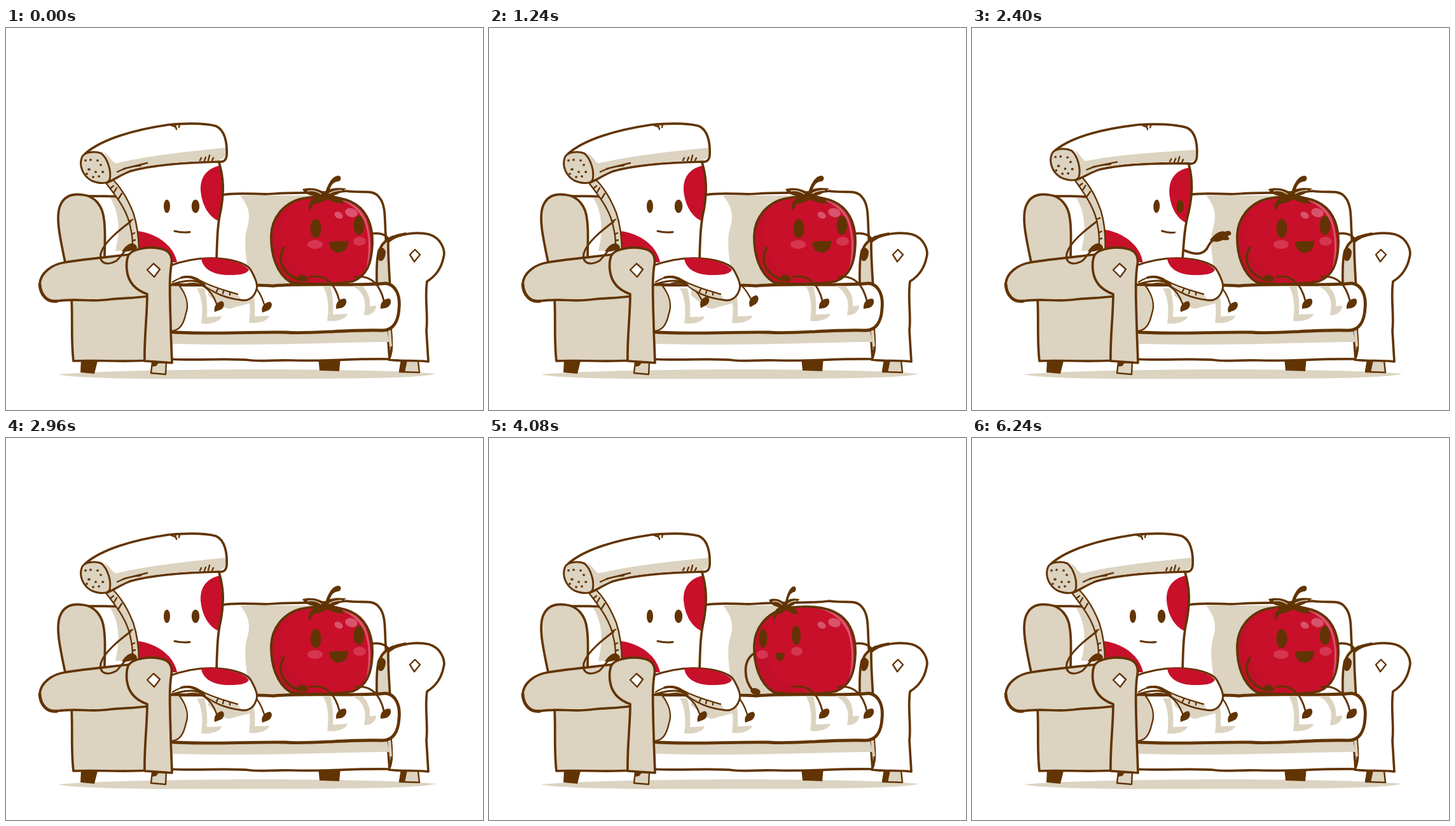
Recreate the animation shown at these times as an HTML page. Size 750 by 600 pixels, loop 6.4 s.

```html
<!DOCTYPE html>
<html lang="en">
<head>
<meta charset="utf-8">
<title>Pizza and tomato on a sofa</title>
<style>
  html, body { margin: 0; width: 100%; height: 100%; overflow: hidden; background: #fff; }
  svg { display: block; width: 750px; height: 600px; }
  .line, .white, .beige { stroke: #623403; stroke-width: 3.7; stroke-linecap: round; stroke-linejoin: round; fill: none; }
  .white { fill: #fff; }
  .beige { fill: #dcd3c1; }
  .paper { fill: #fff; }
  .shade { fill: #dcd3c1; }
  .ink { fill: #623403; }
  .red { fill: #c8102b; }
  .pink { fill: #d8536b; }
  .blush { fill: #d6354f; }
  .thin { stroke-width: 2.4; }
  .mid { stroke-width: 3; }
  .bold { stroke-width: 4.8; }
</style>
</head>
<body>
<svg viewBox="0 0 750 600">
  <path class="shade" d="M82 544C180 535 560 533 676 543C650 551 520 551 380 551C230 552 110 551 82 544Z"/>

  <!-- sofa back -->
  <path class="white" d="M121 263C145 266 160 262 185 266L341 262C370 257 400 263 425 260C450 258 510 260 535 256C560 260 577 253 586 265C598 278 595 300 597 325L600 410H150Z"/>
  <path class="shade" d="M164 267C178 290 180 318 172 350H215V267Z"/>
  <path class="shade" d="M368 263C386 285 384 300 377 322C374 350 380 375 385 402H480V263Z"/>
  <path class="beige" d="M93 368C85 330 77 295 86 277C93 262 108 260 121 262C140 264 152 280 154 300C157 320 155 340 155 364Z"/>

  <!-- sofa feet -->
  <path class="ink" d="M118 521L144 523L139 543L117 541ZM491 518H526L524 539L493 538Z"/>
  <path class="beige thin" d="M230 525H252L251 544L228 542Z"/>
  <path class="beige thin" d="M622 522L648 523L650 541L619 540Z"/>
  <path class="ink" d="M621 522H631L627 541L618 540ZM229 526H240L236 531L229 532Z"/>

  <!-- front panel -->
  <path class="white" d="M255 477H600L603 520C540 519 500 524 450 522C420 521 405 524 385 522C350 518 300 523 258 520Z"/>
  <path class="shade" d="M262 479L599 476L603 493C500 494 400 500 262 496Z"/>

  <!-- right arm -->
  <path class="beige" d="M583 402C582 360 583 342 603 331C612 325 620 325 628 323L606 402Z"/>
  <path class="white" d="M601 336C616 322 648 320 665 324C685 330 691 350 688 360C684 380 672 392 662 398C658 425 664 450 661 475L664 524C640 521 625 524 602 521C609 505 606 490 605 470C608 440 600 370 601 336Z"/>
  <path class="shade" d="M600 474L605 474L607 500L603 500Z"/>
  <path class="line thin" d="M643 348L651 356L642 367L635 356Z"/>

  <!-- seat cushion -->
  <path class="white bold" d="M255 403C300 405 370 402 420 405C480 400 550 406 597 401C613 403 620 420 618 440C617 462 608 475 592 475C540 473 480 481 440 478C380 477 300 482 255 477Z"/>
  <path class="beige thin" d="M258 404L272 404C283 418 288 434 283 448C279 466 273 476 258 476Z"/>
  <g class="shade">
    <path d="M318 408H392L388 430C375 436 362 437 352 441C342 441 332 432 318 420Z"/>
    <path id="cast" d="M498 405L510 405C514 420 515 435 514 450L537 449C535 457 520 462 505 460C508 440 507 420 498 405Z"/>
    <use href="#cast" x="-198" y="4"/>
    <use href="#cast" x="-123" y="3"/>
    <path d="M545 405L560 405C570 415 573 425 572 437L582 436C582 446 572 452 563 451C566 435 566 425 555 412Z"/>
  </g>

  <!-- pizza -->
  <g id="poker">
    <path class="line" d="M300 347L333 349C350 356 361 357 369 347C374 338 377 333 384 329"/>
    <path class="ink" d="M374 333C382 322 392 317 398 320C404 317 409 320 407 325C402 326 401 327 405 331C400 336 396 331 392 334C385 337 378 336 374 333Z"/>
  </g>
  <g id="pizza">
    <path class="paper" d="M160 238C185 262 198 290 205 366L331 364C331 335 332 310 338 285C343 255 342 235 335 208Z"/>
    <path class="red" d="M336 216C315 221 305 235 306 255C308 280 320 297 334 303C341 280 343 250 336 216Z"/>
    <path class="red" d="M207 319C235 322 263 340 269 368H209Z"/>
    <path class="line" d="M335 211C342 235 343 255 338 285C332 310 332 335 331 364"/>
    <path class="beige thin" d="M156 242C178 270 192 290 196 315C200 330 199 340 199 352L209 352C209 325 205 305 200 290C190 265 180 250 168 238Z"/>
    <path class="line thin" d="M164 252L169 248M170 258L174 251M177 268L182 260M194 303L199 301M198 324L202 322M199 334L203 333"/>
    <path class="white" d="M125 197C150 175 200 160 255 152C290 149 315 150 330 154C344 160 348 180 347 200C346 208 342 211 335 210C290 211 230 215 195 225C180 230 172 238 158 243Z"/>
    <path class="shade" d="M154 196C165 202 169 215 175 212C230 199 290 194 345 188L345 203L335 208C290 209 230 213 195 223L164 238C166 222 163 208 154 196Z"/>
    <path class="beige mid" d="M119 204C122 194 140 193 150 197C160 205 166 225 163 238C160 246 145 244 135 240C120 232 115 216 119 204Z"/>
    <path class="line" d="M125 208h.1M133 207h.1M144 208h.1M130 222h1M141 226h.1M152 226h.5M127 229h.1M137 234h.1M146 233h.1M149 215h.1"/>
    <path class="line thin" d="M175 226Q190 218 212 216M185 221L222 212M260 153L265 155M266 153L268 159M273 152L272 156M305 208L307 204M312 208L314 203M318 208L320 200M324 208L326 204"/>
    <g class="ink">
      <ellipse id="pEye1" rx="5" ry="10.5"/>
      <ellipse id="pEye2" rx="6.2" ry="10.5"/>
    </g>
    <path id="pMouth" class="line mid" d="M265 319Q277 322 289 320.5"/>
  </g>
  <g id="pLeg1">
    <path class="line thin" d="M285 402C305 398 322 408 331 433"/>
    <path class="ink" d="M328 446C326 436 332 430 340 429C345 432 343 441 336 443Z"/>
  </g>
  <g id="pLeg2">
    <path class="line thin" d="M356 396C385 394 398 408 406 434"/>
    <path class="ink" d="M403 447C400 437 407 431 415 430C421 433 417 442 411 444Z"/>
  </g>
  <path class="white mid" d="M250 376C280 364 310 360 335 362C362 364 382 372 386 382C393 395 397 405 393 413C389 424 380 430 368 427C345 424 325 416 310 402C295 394 280 396 250 406Z"/>
  <path class="red" d="M307 362C330 359 372 366 382 380C378 387 366 388 350 388C325 388 309 378 307 362Z"/>
  <path class="shade" d="M312 402C328 410 345 414 364 418L369 425C342 422 327 414 312 404Z"/>
  <path class="line thin" d="M262 399C278 389 290 387 304 396C325 408 345 412 364 418M333 410L331 414M342 413L341 417M352 416L352 419"/>
  <path class="line" d="M276 392C292 388 302 396 312 404"/>

  <!-- left arm -->
  <path class="beige" d="M103 424C105 460 102 490 106 523C140 521 180 525 225 522V415Z"/>
  <path class="beige" d="M93 368C72 371 54 385 53 402C54 420 65 431 80 429C110 424 135 431 165 426C190 424 205 424 225 421V352C180 358 130 362 93 368Z"/>
  <path class="line bold" d="M53 402C54 420 65 431 80 429"/>
  <path class="beige" d="M193 356C200 347 225 342 245 347C258 350 262 360 260 372C256 395 258 430 259 470L261 526L218 523C217 490 222 450 222 418C205 412 192 400 190 380C189 370 190 362 193 356Z"/>
  <path class="white thin" d="M232 370L242 379L233 391L222 380Z"/>
  <path class="line mid" d="M196 304C180 316 154 336 149 354C146 371 160 373 173 366C181 360 186 347 197 343"/>
  <path class="ink" d="M182 351C188 342 196 335 203 340C209 345 205 350 198 349C192 352 187 351 182 351Z"/>

  <!-- tomato -->
  <path class="line" d="M575 323C590 321 597 325 602 332M608 328C592 336 586 344 588 357"/>
  <path class="ink" d="M584 350C588 342 594 344 597 351C597 360 593 367 588 366C583 362 583 356 584 350Z"/>
  <path id="body" class="red" d="M417 325C418 300 435 275 465 268C495 262 530 264 550 277C570 290 577 315 576 340C575 370 567 390 545 398C520 403 470 403 447 399C425 385 416 355 417 325Z"/>
  <path fill="#b90f29" opacity=".4" d="M418 325C417 355 425 384 447 397C470 401 500 400 515 397C470 396 435 370 430 325C430 305 440 290 446 280C428 292 419 310 418 325Z"/>
  <path class="pink" d="M510 266C540 268 558 282 566 300C576 330 575 360 566 380C572 350 571 325 564 305C555 285 538 271 510 266Z"/>
  <ellipse class="pink" cx="523" cy="294" rx="7" ry="5" transform="rotate(30 523 294)"/>
  <ellipse class="pink" cx="543" cy="290" rx="10" ry="7" transform="rotate(15 543 290)"/>
  <use href="#body" class="line" style="fill-opacity:0"/>
  <ellipse id="cheek1" class="blush" cy="340" ry="7"/>
  <ellipse id="cheek2" class="blush" cy="335" ry="7"/>
  <g class="ink">
    <ellipse id="tEye1" ry="15"/>
    <ellipse id="tEye2" ry="15"/>
    <path id="tMouth" d="M-15 -6C-7 -10 7 -7 15 -9C16 3 8 10 -1 10C-9 9 -14 3 -15 -6Z"/>
  </g>
  <path id="tArm" class="line"/>
  <ellipse id="tHand" class="ink" rx="8" ry="5"/>
  <g id="stem">
    <path class="ink" d="M-34 -7C-24 -10 -10 -9 0 -2C10 -10 24 -9 35 -8C28 -3 22 2 15 3C25 5 30 10 32 16C22 16 12 13 5 9C-2 13 -8 16 -16 16C-19 20 -21 24 -23 28C-27 16 -20 8 -12 5C-20 3 -30 2 -34 -7Z"/>
    <path d="M-26 -4Q-14 -6 -4 1M8 0Q16 -5 28 -5" fill="none" stroke="#dcd3c1" stroke-width="1.5"/>
    <path class="ink" d="M2 -2C6 -14 12 -27 22 -28C28 -28 28 -20 22 -19C14 -18 10 -12 8 -2Z"/>
  </g>
  <g id="tLeg1">
    <path class="line mid" d="M478 391C500 386 517 400 524 428"/>
    <path class="ink" d="M519 441C518 431 524 425 533 425C538 429 534 439 526 440Z"/>
  </g>
  <g id="tLeg2">
    <path class="line mid" d="M549 391C572 388 587 400 594 428"/>
    <path class="ink" d="M589 441C588 431 594 425 603 425C608 429 604 439 596 440Z"/>
  </g>
</svg>
<script>
const LOOP = 6400, STEP = 40;

// [time, value] steps, eased between neighbours
const lean = [[1960, 0], [2240, 1], [2640, 1], [2960, 0]];
const reach = [[2040, -85], [2280, 9], [2400, 0], [2520, 9], [2600, 0], [2880, -85]];
const turn = [[2960, 0], [3360, 1], [5240, 1], [5480, 0]];
const pizzaKick = [[0, 0], [380, 1], [760, 0], [1140, 1], [1520, 0]];
const tomatoKick = [[5240, 0], [5640, 25], [6240, 0]];
const pizzaBlinks = [[1240, 1520]];
const tomatoBlinks = [[560, 880], [3680, 4080], [5920, 6240]];

const $ = id => document.getElementById(id);
const mix = (a, b, p) => a + (b - a) * p;
const move = (id, value) => $(id).setAttribute('transform', value);

function at(steps, t) {
  if (t <= steps[0][0]) return steps[0][1];
  for (let i = 1; i < steps.length; i++) {
    const [t0, a] = steps[i - 1], [t1, b] = steps[i];
    if (t <= t1) {
      const u = (t - t0) / (t1 - t0);
      return mix(a, b, u * u * (3 - 2 * u));
    }
  }
  return steps[steps.length - 1][1];
}

function openness(blinks, t) {
  const b = blinks.find(([from, to]) => t > from && t < to);
  return b ? 1 - 0.9 * Math.sin(Math.PI * (t - b[0]) / (b[1] - b[0])) : 1;
}

function drawPizza(t) {
  const p = at(lean, t), open = openness(pizzaBlinks, t), kick = at(pizzaKick, t);
  move('pizza', `rotate(${2.3 * p} 265 360)`);
  move('pEye1', `translate(${253 + 34 * p} ${280 - p}) scale(1 ${open})`);
  move('pEye2', `translate(${298 + 26 * p} ${280 - 2 * p}) scale(${1 - 0.1 * p} ${open})`);
  move('pMouth', `translate(${277 + 30 * p} ${-1.5 * p}) scale(${1 - 0.15 * p} 1) translate(-277 0)`);
  move('poker', `translate(${at(reach, t)} 0)`);
  move('pLeg1', `rotate(${-9.3 * kick} 285 405)`);
  move('pLeg2', `rotate(${-11.5 * kick} 356 396)`);
}

function drawTomato(t) {
  const p = at(turn, t), open = openness(tomatoBlinks, t), kick = at(tomatoKick, t);
  const m = (a, b) => mix(a, b, p);
  const wide = (id, cx, rx) => {
    $(id).setAttribute('cx', cx);
    $(id).setAttribute('rx', rx);
  };
  wide('cheek1', m(486, 430), m(12, 9));
  wide('cheek2', m(556, 484), m(10, 9));
  $('tEye1').setAttribute('rx', m(8.5, 6.5));
  $('tEye2').setAttribute('rx', m(8.5, 7));
  move('tEye1', `translate(${m(487, 431)} 315) scale(1 ${open})`);
  move('tEye2', `translate(${m(555, 483)} 310) scale(1 ${open})`);
  const p3 = p ** 3;
  move('tMouth', `translate(${m(523, 457.5)} 343) scale(${1 - 0.53 * p3} ${1 - 0.32 * p3})`);
  $('tArm').setAttribute('d',
    `M${m(437, 416)} ${m(345, 339)}C${m(427, 399)} ${m(360, 350)} ${m(430, 400)} ${m(385, 380)} ${m(462, 415)} ${m(396, 397)}`);
  move('tHand', `translate(${m(467, 419)} ${m(393, 398)}) rotate(15)`);
  move('stem', `translate(${m(500, 464)} ${m(260, 261)}) scale(${m(1, 0.7)} 1)`);
  move('tLeg1', `rotate(${-kick} 478 392)`);
  move('tLeg2', `rotate(${-kick} 548 392)`);
}

const start = performance.now();
function frame() {
  const t = Math.floor(((performance.now() - start) % LOOP) / STEP) * STEP;
  drawPizza(t);
  drawTomato(t);
  requestAnimationFrame(frame);
}
frame();
</script>
</body>
</html>
```
